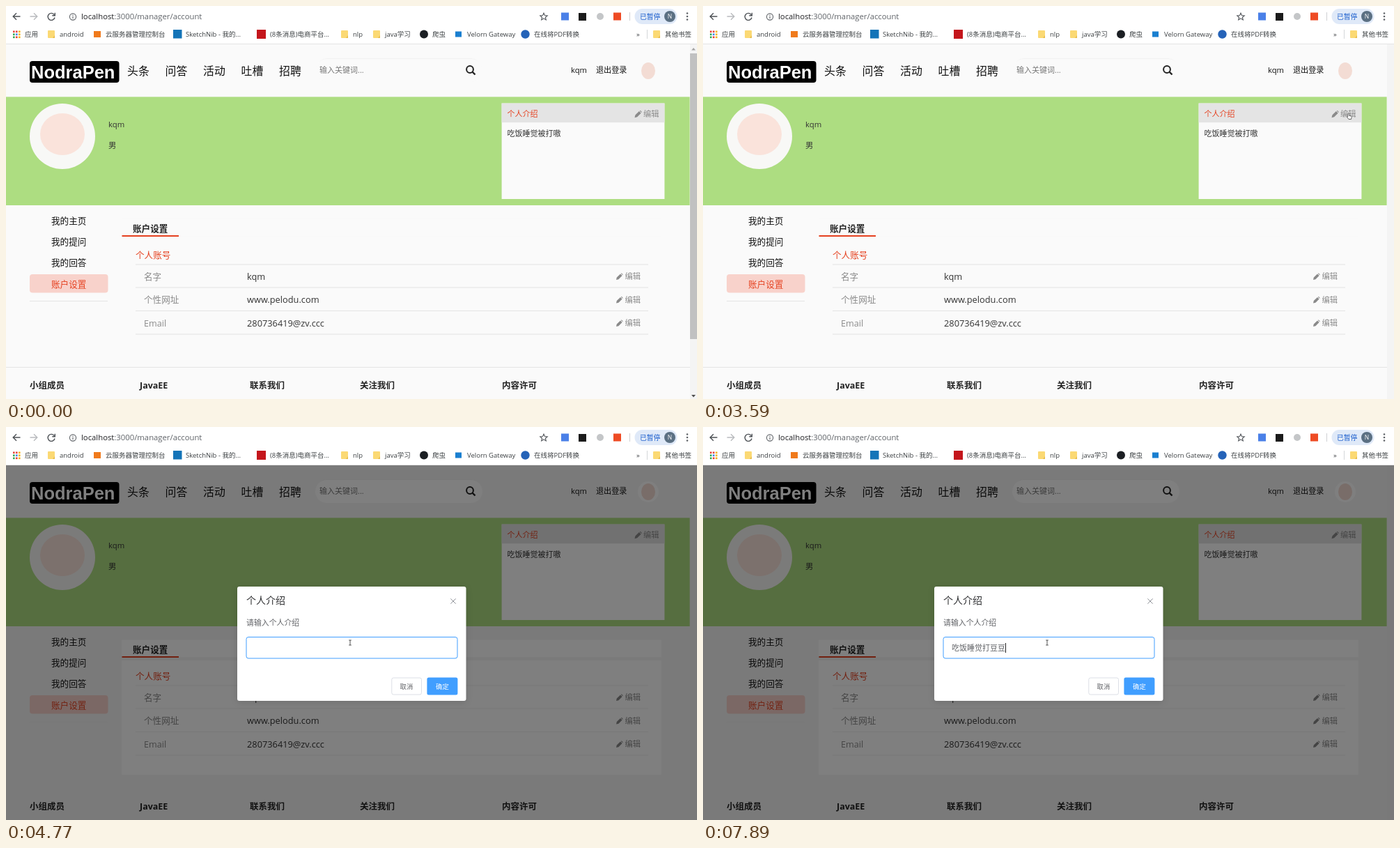
Recreate the animation shown at these times as an HTML page. Size 992 by 564 pixels, loop 8 s.

```html
<!DOCTYPE html>
<html lang="zh-CN">
<head>
<meta charset="utf-8">
<title>账户设置</title>
<style>
html, body { margin: 0; width: 100%; height: 100%; overflow: hidden; background: #fafafa; }
svg { display: block; width: 100%; height: 100%; }
text { font-family: 'Open Sans', 'Noto Sans CJK SC', 'Noto Sans CJK', sans-serif; white-space: pre; }
</style>
</head>
<body>
<svg id="stage" viewBox="0 0 992 564"></svg>
<script>
const LOOP = 8000;
const RED = '#e5401f', BLUE = '#409eff', IME = '#0078d7', INK = '#333', GREY = '#8a8a8a';

const text = (x, mid, s, size, fill = INK, more = '') =>
  `<text x="${x}" y="${mid + size * 0.37}" font-size="${size}" fill="${fill}" ${more}>${s}</text>`;
const rect = (x, y, w, h, fill, more = '') =>
  `<rect x="${x}" y="${y}" width="${w}" height="${h}" fill="${fill}" ${more}/>`;
const circle = (x, y, r, fill, more = '') =>
  `<circle cx="${x}" cy="${y}" r="${r}" fill="${fill}" ${more}/>`;
const path = (d, stroke, width = 1.4, more = '') =>
  `<path d="${d}" fill="none" stroke="${stroke}" stroke-width="${width}" ${more}/>`;
const shape = (d, fill, more = '') => `<path d="${d}" fill="${fill}" ${more}/>`;
const bold = 'font-weight="700"';

const folder = x => rect(x, 35, 10, 11, '#fbd974', 'rx="1"') + shape(`M${x + 7} 46h3v-4z`, '#e9bd4c');
const edit = (x, mid, size = 9) =>
  shape('M0 10l.8-3.4L6 1.4 8.6 4 3.4 9.2zM6.7.8Q7.4 0 8.2.8l1 1q.8.8 0 1.5z', GREY,
    `transform="translate(${x} ${mid - 5}) scale(${size / 9})"`) +
  text(x + 12.5, mid, '编辑', 11.3, GREY);

function browserBar() {
  const apps = ['#e8453c', '#e8453c', '#f6b51e', '#34a853', '#4285f4', '#f6b51e', '#34a853', '#e8453c', '#f6b51e'];
  const dots = apps.map((c, i) => rect(10 + i % 3 * 4, 35.5 + Math.floor(i / 3) * 4, 2.6, 2.6, c)).join('');
  const marks = [
    [27, '应用'], [77, 'android'], [143, '云服务器管理控制台'], [258, 'SketchNib - 我的...'],
    [379, '(8条消息)电商平台...'], [498, 'nlp'], [544, 'java学习'], [612, '爬虫'],
    [662, 'Velorn Gateway'], [758, '在线将PDF转换'], [905, '»'], [946, '其他书签']
  ];
  return rect(0, 0, 992, 54, '#fff') + rect(0, 54, 992, 1, '#e4e4e4') +
    path('M20.5 15H10.5M15 10.2L10.2 15l4.8 4.8', '#4d5156') +
    path('M34.5 15h10M40 10.2l4.8 4.8-4.8 4.8', '#b9bbbe') +
    path('M69.3 12.6A5 5 0 1 0 70 16.5M70.3 9.8v4h-4', '#4d5156') +
    circle(96, 15.5, 4.6, 'none', 'stroke="#5f6368" stroke-width="1.1"') +
    path('M96 14.8v3.2M96 12.7v1.2', '#5f6368', 1.1) +
    text(108, 15, 'localhost<tspan fill="#5f6368">:3000/manager/account</tspan>', 11.3, '#202124') +
    path('M772 10.2l1.5 3.4 3.7.3-2.8 2.4.9 3.6-3.3-2-3.3 2 .9-3.6-2.8-2.4 3.7-.3z', '#4d5156', 1.1) +
    rect(797, 9.5, 11, 11, '#4a80e8') + rect(822, 10, 11, 11, '#1b1b1b') +
    circle(853, 15, 5, '#c4c6c8') + rect(872, 9.5, 11, 11, '#ee4b24') +
    rect(895, 9, 1, 12, '#cfd1d4') + rect(902.5, 4, 61, 22, '#dfe9f8', 'rx="11"') +
    text(910, 15, '已暂停', 9.8, '#1c5fcd') + circle(953, 15, 8, '#5b7083') +
    text(953, 15, 'N', 8.5, '#fff', 'text-anchor="middle"') +
    [10.5, 15, 19.5].map(y => circle(978, y, 1.3, '#5f6368')).join('') +
    dots + [60, 481, 527, 929].map(folder).join('') +
    rect(126, 36, 10, 9, '#f07a1c') + rect(240, 34, 12.5, 12.5, '#1474b8') + rect(360, 34, 13, 13, '#c4161c') +
    circle(600, 40.5, 6, '#1b1f23') + rect(645, 36.5, 9, 8, '#1a7fd0') + circle(745.5, 40.5, 6.2, '#2563b8') +
    rect(920, 34, 1, 13, '#d5d7da') +
    marks.map(([x, s]) => text(x, 40.5, s, 9.5, '#3c4043')).join('');
}

function page() {
  const nav = ['头条', '问答', '活动', '吐槽', '招聘'];
  const side = ['我的主页', '我的提问', '我的回答'];
  const rows = [['名字', 'kqm'], ['个性网址', 'www.pelodu.com'], ['Email', '280736419@zv.ccc']];
  const foot = [[34, '小组成员'], [192, 'JavaEE'], [350, '联系我们'], [508, '关注我们'], [712, '内容许可']];
  return `<rect id="paper" y="55" width="992" height="509"/>` +
    path('M450 80q5-4.5 11-4.5h206q6 0 11 4.5', '#f1f1f1', 1) +
    rect(0, 130.4, 981.6, 155.6, '#addd81') +
    `<g id="cards">${rect(444, 76, 240, 33, '', 'rx="16.5"')}${rect(166, 305.5, 775, 25, '')}` +
    `${rect(166, 335, 775, 164, '')}${rect(711.6, 139.6, 233.8, 137.4, '')}${circle(922, 93, 15, '')}</g>` +
    rect(34, 79, 128.5, 31, '#000', 'rx="4"') +
    text(36, 94.5, 'NodraPen', 25.5, '#fff', `${bold} style="font-family:'Liberation Sans',sans-serif"`) +
    nav.map((s, i) => text(174 + i * 54.5, 93, s, 15.9, '#111')).join('') +
    text(450, 92, '输入关键词...', 11, '#777') +
    circle(666, 91, 4.9, 'none', 'stroke="#222" stroke-width="2"') + path('M669.5 94.5l4 4', '#222', 2.4) +
    text(811, 92, 'kqm', 11.2, '#111') + text(847, 92, '退出登录', 11.1, '#111') +
    `<ellipse cx="922" cy="93" rx="10" ry="12" fill="#f3dcd4"/>` +
    circle(81, 187, 47, '#f8f8f6') + `<ellipse cx="81" cy="184" rx="32" ry="30" fill="#fae3db"/>` +
    text(147, 170, 'kqm', 11.3) + text(147, 200, '男', 11.3) +
    rect(711.6, 139.6, 233.8, 27.6, '#e4e4e4') + text(719.5, 154.5, '个人介绍', 11, RED) +
    edit(902.5, 154.5, 9.6) + text(719.5, 183, '吃饭睡觉被打嗷', 11) +
    side.map((s, i) => text(65, 308 + i * 30.4, s, 12.6, '#111')).join('') +
    rect(34, 385, 112.5, 26.5, '#f8d2cb', 'rx="4"') + text(65, 399, '账户设置', 12.6, RED) +
    text(182, 319, '账户设置', 12.6, '#222', bold) +
    rect(166.5, 329, 81.5, 2, RED) + text(186, 357, '个人账号', 12.6, RED) +
    `<g id="lines">${rect(34, 423, 112, 1, '')}` +
    [370.5, 403.5, 437, 470.5].map(y => rect(186, y, 736, 1, '')).join('') + '</g>' +
    rows.map(([k, v], i) => {
      const y = 388 + i * 33.5;
      return text(198, y, k, 12.6, GREY) + text(346, y, v, 12.8) + edit(876, y);
    }).join('') +
    `<rect id="footLine" y="518" width="982" height="1" fill="#e4e4e4"/>` +
    foot.map(([x, s]) => text(x, 544, s, 12.5, '#222', bold)).join('') +
    rect(982, 55, 10, 509, '#f4f4f4') +
    `<g id="scroll">${rect(982, 68, 10, 410, '#c1c1c1')}${shape('M984 63.5l3-3.5 3 3.5z', '#a3a3a3')}${shape('M984 558l3 3.5 3-3.5z', '#505050')}</g>`;
}

const dialog = () =>
  `<rect id="sheet" x="332" y="229" width="328.5" height="164" rx="3" style="filter:drop-shadow(0 2px 5px rgba(0,0,0,.12))"/>` +
  `<g id="content">${text(345, 249, '个人介绍', 14, '#303133')}` +
  path('M638.3 246.3l7.4 7.4m0-7.4l-7.4 7.4', '#909399', 1) +
  text(345, 281, '请输入个人介绍', 10.9, '#606266') +
  `<g id="frames">${rect(345, 301.5, 303, 30.5, '#fff', `rx="3" stroke="${BLUE}"`)}` +
  rect(553.8, 360, 42.7, 24, '#fff', 'rx="2.5" stroke="#dcdfe6"') + '</g>' +
  text(565.5, 372.3, '取消', 9.4, '#606266') +
  rect(604.4, 359.5, 44, 25, BLUE, 'rx="2.5"') + text(617, 372.3, '确定', 9.4, '#fff') + '</g>';

const stage = document.getElementById('stage');
stage.innerHTML = page() + rect(0, 55, 992, 509, '#000', 'id="veil"') + browserBar() +
  `<g id="dialog">${dialog()}</g><g id="typed"></g><g id="bar"></g><g id="pointer"></g>`;
const $ = id => document.getElementById(id);

// start, end, number of steps, way points
const moves = [
  [300, 990, 10, [[869, 467], [824, 228], [896, 173]]],
  [1160, 1640, 7, [[897, 170], [914, 155], [911, 161]]],
  [1820, 2320, 7, [[905, 164], [800, 205], [644, 269], [628, 279]]],
  [2560, 3290, 10, [[630, 275], [748, 228], [951, 152], [925.5, 153.5]]],
  [3390, 4180, 9, [[925.5, 153.5], [925.5, 153.5], [925.5, 153.5], [760, 215], [600, 285]]],
  [4270, 4770, 7, [[596, 290], [510, 313], [494, 309.5]]]
];
function pointerAt(t) {
  const move = latest(moves, t);
  if (!move) return null;
  const [from, to, n, pts] = move;
  const step = Math.min(n - 1, Math.floor((t - from) / (to - from) * (n - 1) + 0.01));
  const at = step / (n - 1) * (pts.length - 1);
  const i = Math.min(pts.length - 2, Math.floor(at + 1e-6)), f = at - i;
  return [0, 1].map(k => pts[i][k] + (pts[i + 1][k] - pts[i][k]) * f);
}
function pointerShape([x, y], open) {
  if (open && x > 345 && x < 648 && y > 302 && y < 332)
    return path('M-1.8-3.5h3.6M-1.8 3.5h3.6M0-3.5v7', '#444', 0.9);
  if (!open && x > 901 && x < 939 && y > 147 && y < 161)
    return shape('M.2.8Q1.2-.2 2 .8v3l3 .8q.8.3.6 1.5L5 9H1.5L-1.2 5.5q.3-1 1.4 0z', '#fff', 'stroke="#444" stroke-width=".8"');
  return shape('M0 0v6.8l1.6-1.4 1 2.3 1.2-.5-1-2.2h2z', '#fff', 'stroke="#333" stroke-width=".8"');
}

// time, veil, dialog opacity, sheet colour, content strength, offset
const opening = [
  [0, 0, 0, '#fff', 1, 0],
  [3700, 0.2, 0.4, '#fff', 1, -13],
  [3800, 0.42, 1, '#d2d5ce', 0.87, -5.3],
  [3900, 0.5, 1, '#f6f6f5', 0.97, -1.6],
  [4000, 0.5, 1, '#fff', 1, 0]
];

const phrases = [
  { done: '', times: [5070, 5165, 5260, 5350, 5445], end: 5540,
    keys: ['c', 'ch', 'chi', "chi'f", "chi'fan"],
    one: '吃 出 车 成 长 从 才', many: '吃饭 吃饭了 迟饭 吃饭吧 池饭 赤范 持反', split: 3 },
  { done: '吃饭', times: [5710, 5810, 5900, 6140, 6235, 6325, 6418], end: 6510,
    keys: ['s', 'sh', 'shu', 'shui', "shui'j", "shui'ju", "shui'jue"],
    one: '谁 水 睡 税 说 帨 祱', many: '睡觉 水饺 睡教 水脚 税角 水绝 睡决', split: 4 },
  { done: '吃饭睡觉', times: [6660, 6740, 7070, 7170, 7270, 7365, 7465, 7660], end: 7890,
    keys: ['d', 'da', "da'd", "da'do", "da'dou", "da'dou'd", "da'dou'do", "da'dou'dou"],
    one: '打 大 达 答 搭 带 到', many: '大豆 打斗 打豆 大都 大斗 打抖 达到', last: '打豆豆 大豆豆 大豆 打斗 打 大 达', split: 2 }
];
// time, finished text, letters being composed, candidates
const typing = [[0, '', '', '']];
phrases.forEach((p, n) => {
  p.keys.forEach((key, i) => {
    const list = i < p.split ? p.one : p.last && i === p.keys.length - 1 ? p.last : p.many;
    typing.push([p.times[i], p.done, key, list]);
  });
  typing.push([p.end, n < 2 ? phrases[n + 1].done : '吃饭睡觉打豆豆', '', '']);
});

function candidates(left, list) {
  let x = left, cells = '';
  list.split(' ').forEach((word, i) => {
    const w = 32.6 + word.length * 14.5, first = i === 0;
    if (first) cells += rect(x, 325, w + 1, 34, IME);
    cells += text(x + 13.5, 343.5, i + 1, 9, first ? '#fff' : '#777') +
      text(x + 22, 342.5, word, 14.2, first ? '#fff' : '#111');
    x += w;
  });
  x += 3.5;
  const mid = x + 17;
  return rect(left + 0.5, 325.5, x + 34 - left, 33, '#fff', `stroke="${IME}"`) + cells +
    rect(x, 325, 1, 34, IME) +
    circle(mid, 342, 6.8, 'none', 'stroke="#222" stroke-width="1.1"') +
    circle(mid - 2.4, 340, 0.9, '#222') + circle(mid + 2.4, 340, 0.9, '#222') +
    path(`M${mid - 3.6} 343.8q3.6 4.2 7.2 0`, '#222', 1.1);
}

let shown;
function drawTyping(state) {
  if (state === shown) return;
  shown = state;
  const [at, done, key, list] = state;
  const x = 357 + done.length * 11;
  const typed = $('typed');
  typed.innerHTML = text(357, 317, done, 11, '#606266') + text(x, 317, key, 11.2, '#606266', 'id="key"');
  const w = key ? $('key').getComputedTextLength() : 0;
  if (key) typed.innerHTML += path(`M${x} 323h${w}`, '#606266', 1, 'stroke-dasharray="4 1"');
  if (at) typed.innerHTML += rect(x + w, 310, 1, 14, '#222');
  $('bar').innerHTML = key ? candidates(x - 2, list) : '';
}

const latest = (list, t) => list.filter(e => t >= e[0]).pop();
const set = (id, name, value) => $(id).setAttribute(name, value);

function draw(t) {
  const [, veil, alpha, sheet, ink, dy] = latest(opening, t);
  const dim = veil > 0;
  set('veil', 'opacity', veil);
  set('paper', 'fill', dim ? '#f6f6f6' : '#fafafa');
  set('cards', 'fill', dim ? '#fff' : '#fafafa');
  set('lines', 'fill', dim ? '#f2f2f2' : '#e4e4e4');
  set('footLine', 'opacity', dim ? 0 : 1);
  set('scroll', 'opacity', t < 3490 ? 1 : 0);
  set('dialog', 'opacity', alpha);
  set('dialog', 'transform', `translate(0 ${dy})`);
  set('sheet', 'fill', sheet);
  set('content', 'opacity', ink);
  $('content').style.filter = ink < 1 ? `brightness(${ink})` : 'none';
  set('frames', 'opacity', t < 3900 ? 0 : 1);
  drawTyping(latest(typing, t));
  const at = pointerAt(t);
  $('pointer').innerHTML = at ? pointerShape(at, dim) : '';
  if (at) set('pointer', 'transform', `translate(${at})`);
}

const start = performance.now();
function tick() {
  draw((performance.now() - start) % LOOP);
  requestAnimationFrame(tick);
}
tick();
</script>
</body>
</html>
```
